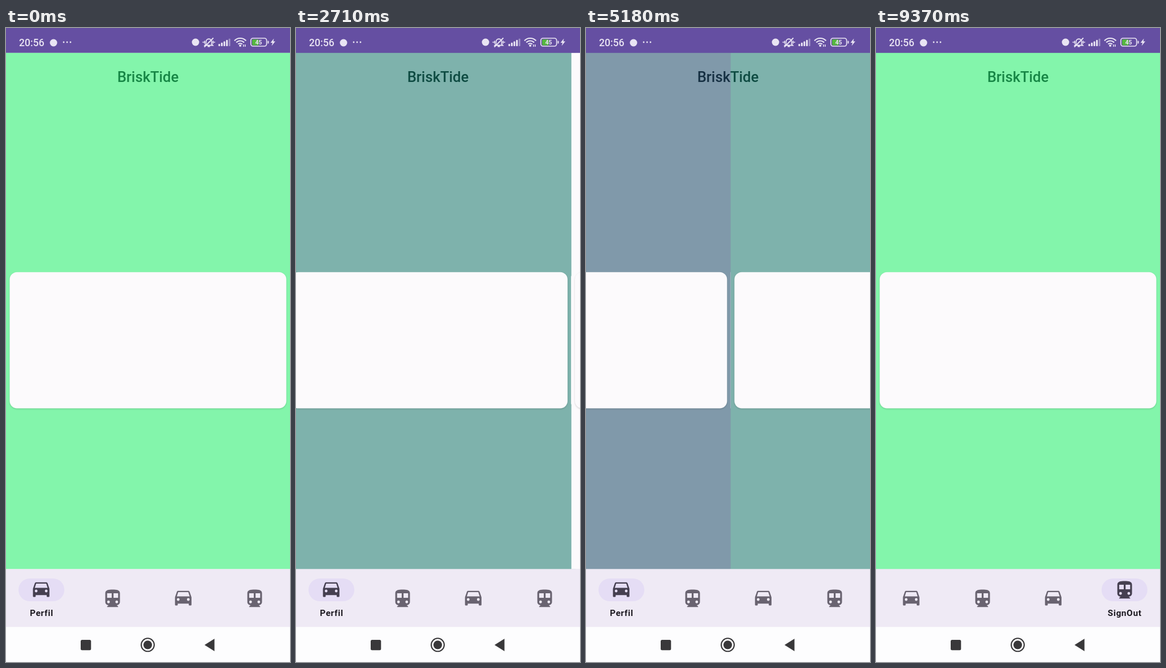
An HTML page with a canvas that plays this animation: 502 px wide and 1116 px high, repeating every 9410 ms.

```html
<!DOCTYPE html>
<html lang="es">
<head>
<meta charset="utf-8">
<title>Pager</title>
<style>
html, body { margin: 0; width: 100%; height: 100%; overflow: hidden; background: #fdfdfe; }
canvas { display: block; width: 100vw; height: 100vh; }
</style>
</head>
<body>
<canvas id="stage"></canvas>
<script>
const W = 502, H = 1116, LOOP = 9410;
const TOP = 43.5, NAV = 952.6, NAV_END = 1054.5;
const SURFACE = '#fcfafc';
const FONT = 'Roboto, "Noto Sans", sans-serif';

const canvas = document.getElementById('stage');
const ctx = canvas.getContext('2d');
const dpr = window.devicePixelRatio || 1;
canvas.width = W * dpr;
canvas.height = H * dpr;

const pages = [
  { bg: '#83f5ab', ink: '#168645' },
  { bg: '#8099aa', ink: '#152f42' },
  { bg: '#7eb2ac', ink: '#0e4b42' },
  { bg: SURFACE, ink: '#8a888b' }
];

// start, duration, from page, to page
const swipes = [
  [640, 560, 0, 1],
  [1966, 420, 1, 2],
  [2676, 490, 2, 3],
  [4220, 460, 3, 2],
  [4982, 530, 2, 1],
  [5700, 480, 1, 0]
];

// time, selected tab
const taps = [[6480, 1], [7260, 2], [8260, 3]];
const TAP_MS = 300;

const car = {
  dx: -0.4, dy: -1,
  path: new Path2D('M18.92 6.01C18.72 5.42 18.16 5 17.5 5h-11c-.66 0-1.21.42-1.42 1.01L3 12v8c0 .55.45 1 1 1h1c.55 0 1-.45 1-1v-1h12v1c0 .55.45 1 1 1h1c.55 0 1-.45 1-1v-8zM6.5 16a1.5 1.5 0 1 1 0-3 1.5 1.5 0 0 1 0 3zm11 0a1.5 1.5 0 1 1 0-3 1.5 1.5 0 0 1 0 3zM5 11l1.5-4.5h11L19 11z')
};
const train = {
  dx: 0.3, dy: 1.6,
  path: new Path2D('M12 2c-4.42 0-8 .5-8 4v9.5C4 17.43 5.57 19 7.5 19L6 20.5v.5h12v-.5L16.5 19c1.93 0 3.5-1.57 3.5-3.5V6c0-3.5-3.58-4-8-4zM7.5 17a1.5 1.5 0 1 1 0-3 1.5 1.5 0 0 1 0 3zm3.5-6H6V6h5zm5.5 6a1.5 1.5 0 1 1 0-3 1.5 1.5 0 0 1 0 3zm1.5-6h-5V6h5z')
};
const bell = new Path2D('M-7 5H7L5 3V-1C5-8-5-8-5-1V3zM-2 7H2');

const tabs = [
  { icon: car, label: 'Perfil' },
  { icon: train, label: 'Lista' },
  { icon: car, label: 'Buscar' },
  { icon: train, label: 'SignOut' }
];

const clamp = v => Math.min(1, Math.max(0, v));
const smooth = u => u * u * (3 - 2 * u);
const fling = u => smooth(1 - Math.pow(1 - u, 1.5));
const mix = (a, b, k) => a + (b - a) * k;

function pageAt(t) {
  let p = 0;
  for (const [start, ms, from, to] of swipes) {
    if (t >= start) p = mix(from, to, fling(clamp((t - start) / ms)));
  }
  return p;
}

function tabWeights(t) {
  const w = [1, 0, 0, 0];
  let current = 0;
  for (const [start, next] of taps) {
    if (t < start) break;
    const k = smooth(clamp((t - start) / TAP_MS));
    w[current] = 1 - k;
    w[next] = k;
    current = next;
  }
  return w;
}

function rect(x, y, w, h, color) {
  ctx.fillStyle = color;
  ctx.fillRect(x, y, w, h);
}

function round(x, y, w, h, r, color) {
  ctx.fillStyle = color;
  ctx.beginPath();
  ctx.roundRect(x, y, w, h, r);
  ctx.fill();
}

function disc(x, y, r, color) {
  ctx.fillStyle = color;
  ctx.beginPath();
  ctx.arc(x, y, r, 0, Math.PI * 2);
  ctx.fill();
}

function poly(points, color) {
  ctx.fillStyle = color;
  ctx.beginPath();
  points.forEach(([x, y]) => ctx.lineTo(x, y));
  ctx.closePath();
  ctx.fill();
}

function text(s, x, y, size, weight, color, align = 'center', spacing = 0) {
  ctx.font = `${weight} ${size}px ${FONT}`;
  ctx.letterSpacing = spacing + 'px';
  ctx.textAlign = align;
  ctx.fillStyle = color;
  ctx.fillText(s, x, y);
}

function drawPage(page, x) {
  ctx.save();
  ctx.beginPath();
  ctx.rect(x, TOP, W, NAV - TOP);
  ctx.clip();
  rect(x, TOP, W, NAV - TOP, page.bg);
  ctx.shadowColor = 'rgba(0,0,0,.16)';
  ctx.shadowBlur = 3 * dpr;
  ctx.shadowOffsetY = 1.2 * dpr;
  round(x + 6.5, 429.7, 489, 239.8, 13, SURFACE);
  ctx.shadowColor = 'transparent';
  text('BriskTide', 251, 95, 25.6, 500, page.ink);
  ctx.restore();
}

function drawStatus() {
  const ink = '#e9e4f3';
  rect(0, 0, W, TOP, '#654fa2');
  text('20:56', 23, 32, 17.6, 500, ink, 'left');
  disc(84, 26, 6.5, ink);
  for (let i = 0; i < 3; i++) disc(102 + i * 6, 25, 1.4, ink);
  disc(335, 25, 6.5, ink);

  ctx.strokeStyle = ink;
  ctx.lineWidth = 1.8;
  ctx.save();
  ctx.translate(358.5, 25.5);
  ctx.stroke(bell);
  ctx.beginPath();
  ctx.moveTo(-8, 8);
  ctx.lineTo(8, -8);
  for (const s of [-1, 1]) {
    ctx.moveTo(s * 7.5, -3);
    ctx.lineTo(s * 7.5, 2);
    ctx.moveTo(s * 10, -1.5);
    ctx.lineTo(s * 10, 0.5);
  }
  ctx.stroke();
  ctx.restore();

  for (let i = 0; i < 5; i++) {
    const h = 4 + i * 2.3;
    round(375.5 + i * 4.5, 32 - h, 3, h, 1, i < 4 ? ink : '#9f91c6');
  }

  ctx.lineWidth = 2.2;
  for (const r of [5, 9.5, 14]) {
    ctx.beginPath();
    ctx.arc(414, 32, r, -Math.PI * 0.76, -Math.PI * 0.24);
    ctx.stroke();
  }
  disc(414, 31, 2, ink);
  rect(419, 29, 1.5, 4, ink);
  rect(422, 29, 1.5, 4, ink);

  round(435, 20, 12, 10.5, 2, '#55b83f');
  ctx.lineWidth = 1.7;
  ctx.beginPath();
  ctx.roundRect(432.7, 18, 28, 14, 4);
  ctx.stroke();
  round(462.5, 22.5, 2, 5, 1, ink);
  text('45', 446.5, 28.8, 10.5, 700, ink);
  poly([[473.5, 18.5], [467.5, 26], [471, 26], [469.5, 31.5], [476, 23.5], [472.5, 23.5]], ink);
}

function drawTab({ icon, label }, i, k) {
  const cx = 62.6 + i * 125.55;
  if (k > 0) {
    const w = 81 * mix(0.4, 1, k);
    ctx.globalAlpha = k;
    round(cx - w / 2, 969, w, 40, 20, '#e5ddf5');
    text(label, cx + 0.3, 1035, 15.4, 700, '#1d1a21', 'center', 0.64);
    ctx.globalAlpha = 1;
  }
  const tone = [[105, 69], [99, 63], [112, 80]].map(([a, b]) => Math.round(mix(a, b, k)));
  const scale = 1.62;
  ctx.save();
  ctx.translate(cx + icon.dx, mix(1003, 988, k) + icon.dy);
  ctx.scale(scale, scale);
  ctx.translate(-12, -12);
  ctx.fillStyle = `rgb(${tone})`;
  ctx.fill(icon.path, 'evenodd');
  ctx.restore();
}

function drawSystemBar() {
  const ink = '#39383a';
  rect(0, NAV_END, W, H - NAV_END, '#fdfdfe');
  round(132, 1077, 18.3, 18.3, 2.5, ink);
  disc(250.5, 1085.8, 7.6, ink);
  ctx.strokeStyle = ink;
  ctx.lineWidth = 2.1;
  ctx.beginPath();
  ctx.arc(250.5, 1085.8, 11.5, 0, Math.PI * 2);
  ctx.stroke();
  poly([[351, 1086], [368.5, 1075], [368.5, 1097]], ink);
}

function draw(t) {
  ctx.setTransform(dpr, 0, 0, dpr, 0, 0);
  const pos = pageAt(t);
  pages.forEach((page, i) => {
    const x = (i - pos) * W;
    if (Math.abs(x) < W) drawPage(page, x);
  });
  drawStatus();
  rect(0, NAV, W, NAV_END - NAV, '#efeaf5');
  const weights = tabWeights(t);
  tabs.forEach((tab, i) => drawTab(tab, i, weights[i]));
  drawSystemBar();
}

const begin = performance.now();
function tick() {
  draw((performance.now() - begin) % LOOP);
  requestAnimationFrame(tick);
}
tick();
</script>
</body>
</html>
```
